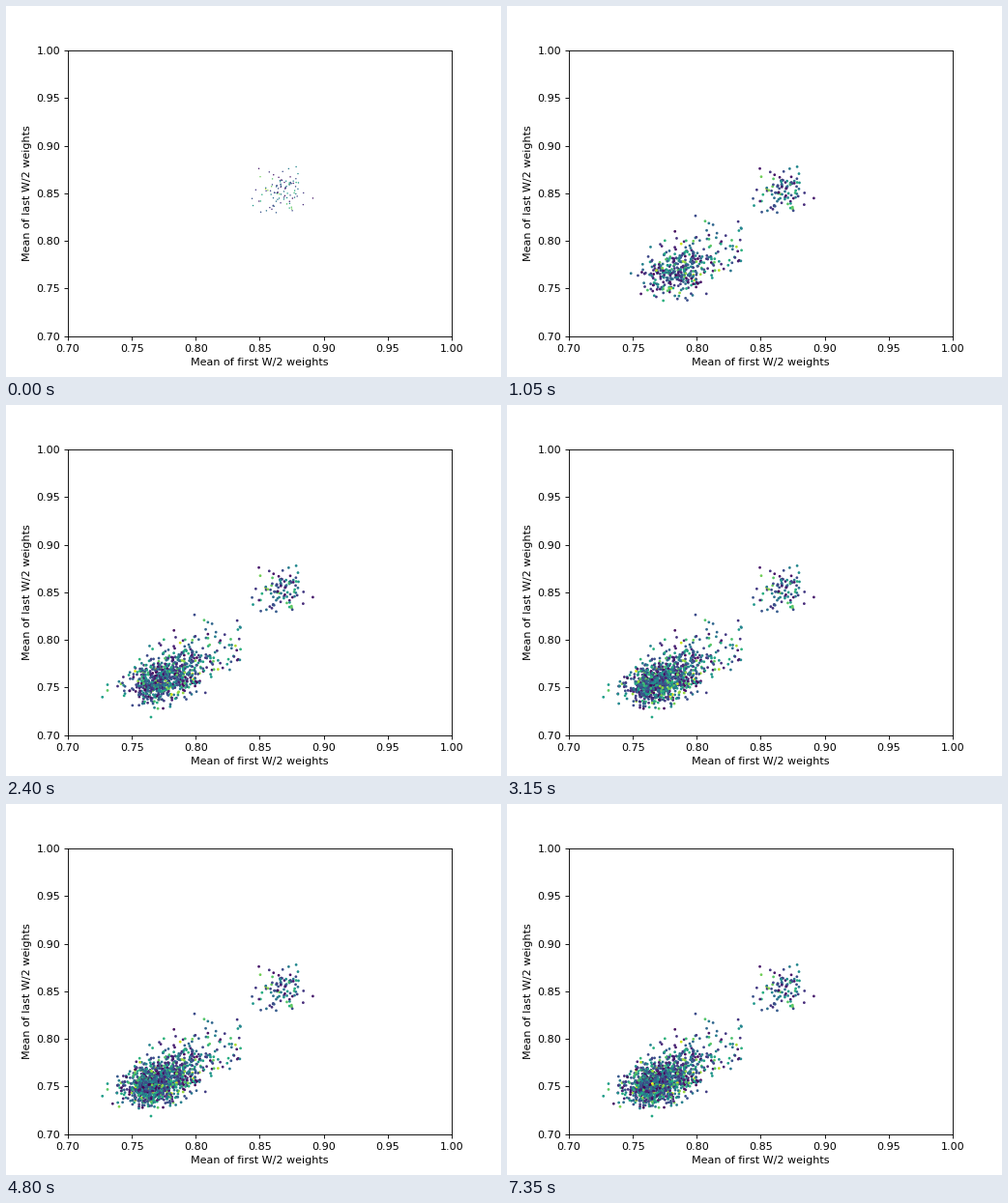
Animation, 512 px wide and 384 px high, one loop 7.5 s. Source, as a matplotlib script:

```python
import numpy as np
import matplotlib.pyplot as plt
from matplotlib.animation import FuncAnimation

FRAMES = 50
INTERVAL = 150
FIRST_DIAMETER = 1.3   # points
DIAMETER = 2.5

rng = np.random.default_rng(12)


def blob(n, mean, sd, low, high):
    """n dots (x, y, colour value) around mean, folded back inside low..high."""
    xy = rng.normal(mean, sd, (n, 2))
    xy = np.where(xy < low, 2 * np.array(low) - xy, xy)
    xy = np.where(xy > high, 2 * np.array(high) - xy, xy)
    return np.column_stack([xy, rng.beta(1.1, 2.1, n)])


def generation(k):
    if k == 0:
        return blob(100, (.867, .852), (.0105, .0115), (.839, .829), (.893, .878))
    # The cloud slides down to its resting place while births die out
    n = round(50 / (1 + np.exp((k - 26) / 3)))
    ease = np.exp(-k / 7)
    mean = (.762 + .038 * ease, .747 + .038 * ease)
    sd = .0095 + .004 * ease
    dots = blob(n, mean, (sd, sd * .95), (.738, .727), (.835, .825))
    if k <= 4:
        trail = blob(12, (.817, .798), (.0125, .017), (.775, .76), (.839, .834))
        dots = np.vstack([dots, trail])
    return dots


# Lone dots on the rim of the cloud: birth step, x, y, colour value
STRAYS = np.array([
    (11, .727, .740, .55), (11, .731, .747, .75), (15, .731, .753, .55),
    (16, .765, .719, .60), (25, .735, .732, .05),
])

groups = [generation(k) for k in range(FRAMES)]
points = np.vstack(groups + [STRAYS[:, 1:]])
birth = np.append(np.repeat(np.arange(FRAMES), [len(g) for g in groups]),
                  STRAYS[:, 0])
colors = plt.get_cmap("viridis")(points[:, 2])

fig, ax = plt.subplots(figsize=(6.4, 4.8), dpi=80)
ax.set(xlim=(.7, 1), ylim=(.7, 1),
       xlabel="Mean of first W/2 weights", ylabel="Mean of last W/2 weights")
scatter = ax.scatter([], [], linewidths=0)


def update(k):
    alive = birth <= k
    scatter.set_offsets(points[alive, :2])
    scatter.set_facecolor(colors[alive])
    scatter.set_sizes([(DIAMETER if k else FIRST_DIAMETER) ** 2])
    return scatter,


anim = FuncAnimation(fig, update, frames=FRAMES, interval=INTERVAL,
                     init_func=lambda: update(0), repeat=True, repeat_delay=0)
plt.show()
```
